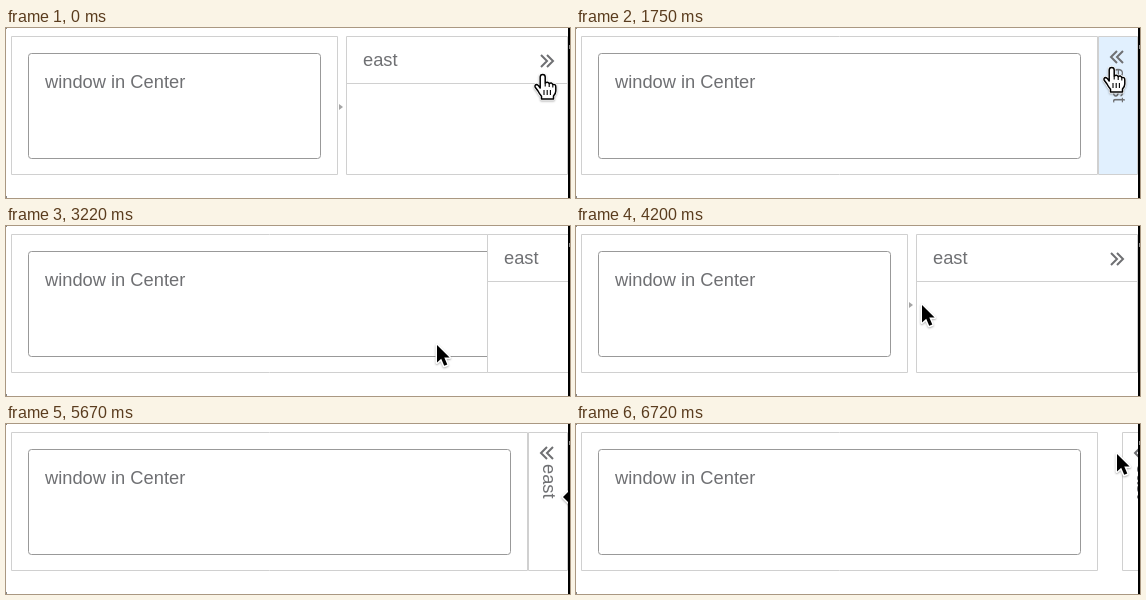
An HTML page with a canvas that plays this animation: 564x170 px, repeating every 6.79 s.

```html
<!DOCTYPE html>
<html lang="en">
<head>
<meta charset="utf-8">
<title>Collapsible east region</title>
<style>
  html, body { margin: 0; width: 100%; height: 100%; overflow: hidden; background: #fff; }
  canvas { display: block; }
</style>
</head>
<body>
<canvas id="stage" width="564" height="170"></canvas>
<script>
const ctx = document.getElementById('stage').getContext('2d');
const LOOP = 6790, STEP = 70;
const EDGE = 562, TOP = 8, BOTTOM = 147;
const PANEL_X = 340, STRIP_X = 522, OFF_X = 564;
const LINE = '#d0d0d0', TEXT = '#6f7073', HOVER = '#e1f0fe';
const FONT = '18.3px "Liberation Sans", Arial, sans-serif';

// time, tip x, tip y, cursor shape used from that moment on
const CURSOR_KEYS = [
  [0, 537, 47, 'hand'], [210, 546, 29, 'hand'], [770, 546, 29, 'hand'],
  [840, 545, 32, 'arrow'], [1120, 521, 71, 'arrow'], [1330, 490, 84, 'arrow'],
  [1540, 481, 82, 'arrow'], [1680, 526, 50, 'hand'], [1750, 536, 40, 'hand'],
  [2100, 546, 29, 'hand'], [2800, 546, 29, 'arrow'], [2870, 546, 30, 'arrow'],
  [3220, 431, 119, 'arrow'], [3360, 403, 126, 'arrow'], [3600, 376, 118, 'arrow'],
  [4060, 350, 86, 'arrow'], [4200, 346, 79, 'arrow'], [4340, 344, 84, 'hand'],
  [4970, 344, 84, 'hand'], [5040, 346, 85, 'arrow'], [5300, 440, 92, 'arrow'],
  [5600, 552, 75, 'resize'], [5670, 557, 73, 'resize'], [5810, 552, 60, 'hand'],
  [6160, 542, 34, 'hand'], [6370, 541, 32, 'hand'], [6580, 541, 31, 'arrow'],
  [6720, 541, 30, 'arrow'], [LOOP, 541, 30, 'arrow']
];

const CLICKS = [[490, 540, 31], [2730, 540, 31], [4970, 337, 89], [6510, 536, 32]];

const within = (t, from, to) => t >= from && t < to;
const mix = (a, b, p) => a + (b - a) * p;

function ease(t, start, duration) {
  const p = Math.min(1, Math.max(0, (t - start) / duration));
  return p * p * (3 - 2 * p);
}

function frame(x, y, right, bottom, color = LINE, radius = 0) {
  ctx.beginPath();
  ctx.roundRect(x + .5, y + .5, right - x - 1, bottom - y - 1, radius);
  ctx.fillStyle = '#fff';
  ctx.fill();
  ctx.strokeStyle = color;
  ctx.lineWidth = 1;
  ctx.stroke();
}

function label(text, x, y) {
  ctx.font = FONT;
  ctx.fillStyle = TEXT;
  ctx.fillText(text, x, y);
}

function chevrons(x, y, direction) {
  ctx.beginPath();
  for (const shift of [-3, 3]) {
    ctx.moveTo(x + shift - 3 * direction, y - 6);
    ctx.lineTo(x + shift + 3 * direction, y);
    ctx.lineTo(x + shift - 3 * direction, y + 6);
  }
  ctx.strokeStyle = TEXT;
  ctx.lineWidth = 2;
  ctx.stroke();
}

function drawCenter(wide) {
  const right = wide ? STRIP_X : 332;
  frame(5, TOP, right, BOTTOM);
  frame(22, 25, right - 17, 131, '#999', 3);
  label('window in Center', 39, 60);
}

function drawSplitter(hovered) {
  if (hovered) {
    ctx.fillStyle = HOVER;
    ctx.fillRect(332, TOP, 8, BOTTOM - TOP);
  }
  ctx.fillStyle = '#a5a5a5';
  ctx.beginPath();
  ctx.moveTo(333, 76);
  ctx.lineTo(337, 79);
  ctx.lineTo(333, 82);
  ctx.fill();
}

function drawPanel(x) {
  frame(x, TOP, x + 222, BOTTOM);
  ctx.fillStyle = LINE;
  ctx.fillRect(x, 55, 222, 1);
  label('east', x + 17, 38);
  chevrons(x + 201, 33, 1);
}

function drawStrip(x, hovered) {
  frame(x, TOP, x + 40, BOTTOM);
  if (hovered) {
    ctx.fillStyle = HOVER;
    ctx.fillRect(x + 1, TOP + 1, 38, BOTTOM - TOP - 2);
  }
  chevrons(x + 19, 29, -1);
  ctx.save();
  ctx.translate(x + 15, 40);
  ctx.rotate(Math.PI / 2);
  label('east', 0, 0);
  ctx.restore();
}

function drawRegions(t) {
  const firstCollapse = within(t, 840, 3430), secondCollapse = t >= 4970;
  const wide = firstCollapse || secondCollapse;
  drawCenter(wide);
  if (!wide) {
    drawSplitter(within(t, 4340, 4970));
    drawPanel(PANEL_X);
    return;
  }
  const start = firstCollapse ? 840 : 4970;
  const click = firstCollapse ? 2730 : 6510;
  if (t < start + 350) {
    drawPanel(Math.round(mix(PANEL_X, OFF_X, ease(t, start, 335))));
  } else if (t < click + 350) {
    const shown = ease(t, start + 330, 250) - ease(t, click + 74, 250);
    const hovered = within(t, 1680, 2800) || within(t, 5810, 6580);
    drawStrip(Math.round(mix(OFF_X, STRIP_X, shown)), hovered);
  } else {
    drawPanel(Math.round(mix(OFF_X, PANEL_X, ease(t, 3080, 340))));
  }
}

function drawClicks(t) {
  for (const [start, x, y] of CLICKS) {
    if (!within(t, start, start + 210)) continue;
    const p = (t - start + STEP) / 210;
    ctx.beginPath();
    ctx.arc(x, y, 42 * p, 0, 7);
    ctx.strokeStyle = `rgba(120,120,120,${.5 - .35 * p})`;
    ctx.lineWidth = 2;
    ctx.stroke();
  }
}

const SHAPES = {
  arrow: new Path2D('M0 0V17.5L4.2 13.7 7.2 20.8 10.3 19.5 7.3 12.5H12.6Z'),
  resize: new Path2D('M0 0L8 -8V8Z'),
  hand: new Path2D('M-2.8 13V2Q-2.8-.6-.3-.6T2.2 2V8Q4.5 6 6.2 8.6 8.5 7 9.8 9.6 12.8 8.7 12.8 12V16Q12.8 18.5 10.5 21V24H-1.5V21.3Q-3.5 19-5 16L-7.8 12.3Q-8.6 10-6.6 9.5-5 9.4-2.8 13Z')
};

function drawCursor(t) {
  const next = CURSOR_KEYS.findIndex(key => key[0] > t);
  const [t0, x0, y0, shape] = CURSOR_KEYS[next - 1];
  const [t1, x1, y1] = CURSOR_KEYS[next];
  const p = (t - t0) / (t1 - t0);
  const path = SHAPES[shape];
  ctx.save();
  ctx.translate(mix(x0, x1, p), mix(y0, y1, p));
  ctx.lineJoin = 'round';
  ctx.shadowColor = 'rgba(0,0,0,.3)';
  ctx.shadowBlur = 2;
  ctx.shadowOffsetY = 1;
  ctx.strokeStyle = '#fff';
  ctx.lineWidth = 3;
  ctx.stroke(path);
  ctx.shadowColor = 'transparent';
  if (shape === 'hand') {
    ctx.fillStyle = '#fff';
    ctx.fill(path);
    ctx.strokeStyle = '#000';
    ctx.lineWidth = 1.5;
    ctx.stroke(path);
    ctx.lineWidth = 1.1;
    ctx.stroke(new Path2D('M2.2 8V11.5M6.2 9V12M9.8 10V12.5M1 15V20M4.2 15V20M7.4 15V20'));
  } else {
    ctx.fillStyle = '#000';
    ctx.fill(path);
  }
  ctx.restore();
}

function drawEdges() {
  ctx.fillStyle = '#000';
  ctx.fillRect(EDGE, 0, 2, 170);
  ctx.fillStyle = '#888';
  ctx.fillRect(0, 0, 1, 1);
  ctx.fillRect(0, 168, 1, 2);
  ctx.fillRect(563, 17, 1, 4);
}

function render(now) {
  const t = Math.floor((now % LOOP) / STEP) * STEP;
  ctx.fillStyle = '#fff';
  ctx.fillRect(0, 0, 564, 170);
  drawRegions(t);
  drawClicks(t);
  drawCursor(t);
  drawEdges();
}

let begun;
function tick(now) {
  begun ??= now;
  render(now - begun);
  requestAnimationFrame(tick);
}
render(0);
requestAnimationFrame(tick);
</script>
</body>
</html>
```
